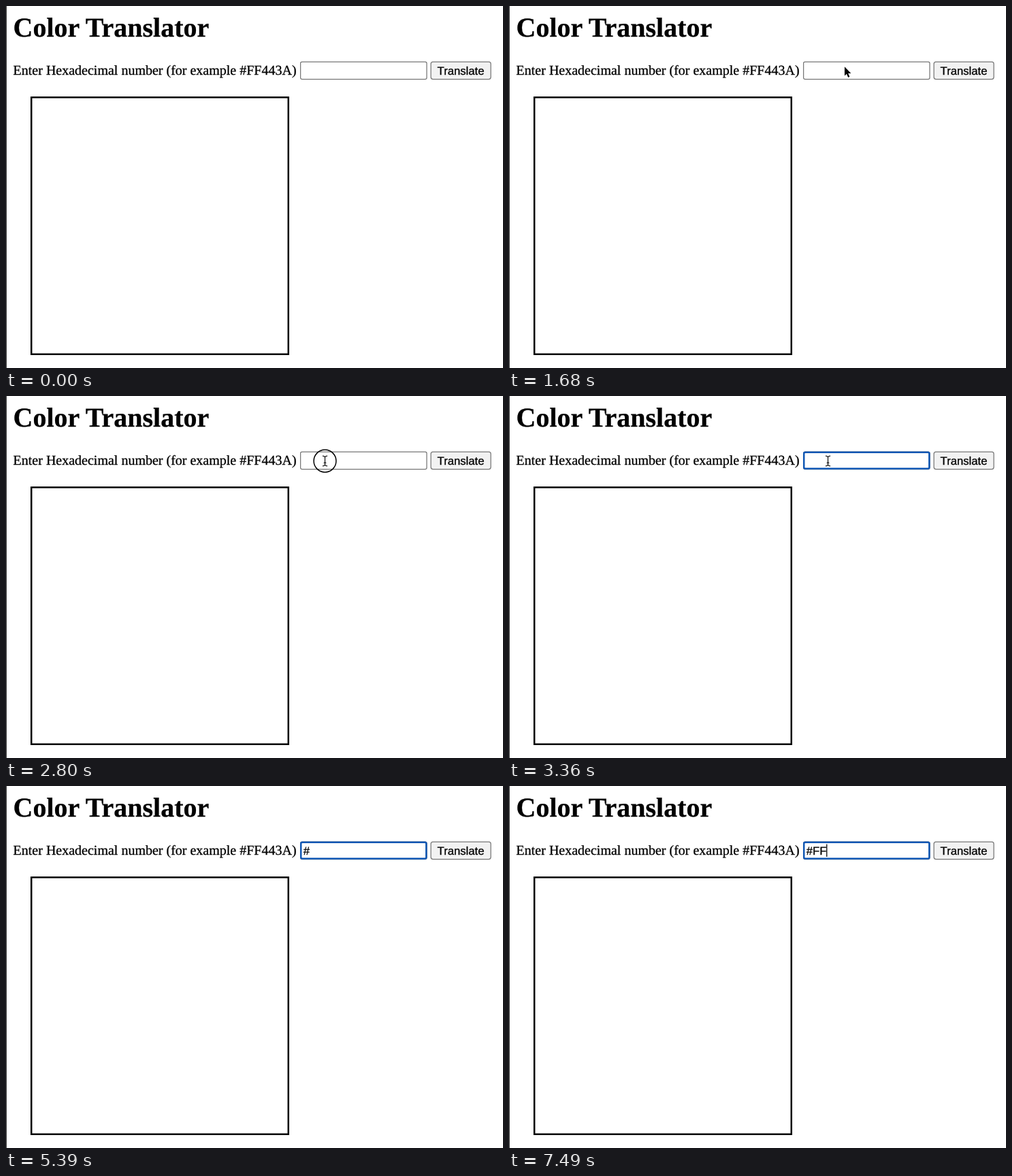
An HTML page that plays this animation: 730x532 px, repeating every 8000 ms.

```html
<!DOCTYPE html>
<html lang="en">
<head>
<meta charset="utf-8">
<title>Color Translator</title>
<style>
  html, body { margin: 0; width: 100%; height: 100%; overflow: hidden; background: #fff; }
  svg { display: block; width: 730px; height: 532px; }
  text { white-space: pre; text-rendering: geometricPrecision; stroke: #000; stroke-width: .3px; }
  .serif { font-family: "Liberation Serif", "Times New Roman", serif; }
  .sans { font-family: "Liberation Sans", Arial, sans-serif; font-size: 16.667px; }
  .control { stroke: #767676; stroke-width: 1.25px; }
</style>
</head>
<body>
<svg viewBox="0 0 730 532" xmlns="http://www.w3.org/2000/svg">
  <rect width="730" height="532" fill="#fff"/>
  <rect width="1" height="532" fill="#333"/>

  <text class="serif" x="10.5" y="45" font-size="40" font-weight="bold">Color Translator</text>
  <text class="serif" x="10.6" y="101" font-size="20">Enter Hexadecimal number (for example #FF443A)</text>

  <rect class="control" x="432.6" y="82.1" width="185.4" height="25.4" rx="2.2" fill="#fff"/>
  <rect id="focus" x="433.2" y="82.7" width="184.1" height="24.1" rx="2" fill="none" stroke="#1057b4" stroke-width="2.5"/>
  <text id="typed" class="sans" x="436.8" y="100.6"></text>
  <rect id="caret" y="85.5" width="1.25" height="18.5"/>

  <rect class="control" x="624.1" y="82.1" width="88" height="25.4" rx="3" fill="#f2f2f2"/>
  <text class="sans" x="668" y="100.6" text-anchor="middle">Translate</text>

  <rect x="37.25" y="134.25" width="377.5" height="377.5" fill="none" stroke="#000" stroke-width="2.5"/>

  <g id="pointer">
    <path id="arrow" d="M0 0V13.2L3 10.4L5.2 15.6L7.4 14.7L5.2 9.6H9.4Z" stroke="#fff" stroke-width="1.6" paint-order="stroke"/>
    <path id="beam" d="M-3.6 -7.4Q-.6 -7.4 0 -5.8Q.6 -7.4 3.6 -7.4M0 -5.8V5.8M-3.6 7.4Q-.6 7.4 0 5.8Q.6 7.4 3.6 7.4M-1.8 2.6H1.8" fill="none" stroke="#111" stroke-width="1.25"/>
    <circle id="ring" fill="none" stroke="#000" stroke-width="1.5"/>
  </g>
</svg>
<script>
const LOOP = 8000, TICK = 70, BLINK = 525;
const [focus, typed, caret, pointer, arrow, beam, ring] =
  ["focus", "typed", "caret", "pointer", "arrow", "beam", "ring"].map(id => document.getElementById(id));

const entry = { x: 374, y: 482 };
const moves = [
  { from: 840, to: 980, x: 511.6, y: 117 },
  { from: 1190, to: 1820, x: 487.6, y: 87.5 },
  { from: 2380, to: 2730, x: 468.5, y: 95.5 }
];
const beamAt = 2450, clickAt = 2800, hideAt = 3780;
const word = "#FF", keys = [4270, 6300, 6440];
const caretResets = [clickAt, 4865, ...keys];

const within = (t, from, to) => t >= from && t < to;
const show = (node, on) => node.setAttribute("visibility", on ? "visible" : "hidden");

// Each move runs evenly in x and eases out in y.
function pointerAt(t) {
  let { x, y } = entry;
  for (const m of moves) {
    const p = Math.min(1, Math.max(0, (t - m.from) / (m.to - m.from)));
    x += (m.x - x) * p;
    y += (m.y - y) * Math.sin(p * Math.PI / 2);
  }
  return [x, y];
}

// The caret restarts its blink after every click, key press or edit.
function caretOn(t) {
  const last = Math.max(...caretResets.filter(r => r <= t));
  return Math.floor((t - last) / BLINK) % 2 === 0;
}

function draw(time) {
  const t = Math.floor((time % LOOP) / TICK + 1e-6) * TICK;
  const focused = t > clickAt;

  typed.textContent = word.slice(0, keys.filter(k => k <= t).length);
  caret.setAttribute("x", 436.8 + typed.getComputedTextLength() - .3);
  show(caret, focused && caretOn(t));
  show(focus, focused);

  pointer.setAttribute("transform", `translate(${pointerAt(t)})`);
  show(arrow, within(t, moves[0].from, beamAt));
  show(beam, within(t, beamAt, hideAt));

  ring.setAttribute("r", t < beamAt ? 22 : 16.4);
  show(ring, within(t, 1960, 2100) || within(t, clickAt, 3010));
}

const start = performance.now();
function tick(now) {
  draw(Math.max(0, now - start));
  requestAnimationFrame(tick);
}
draw(0);
requestAnimationFrame(tick);
</script>
</body>
</html>
```
